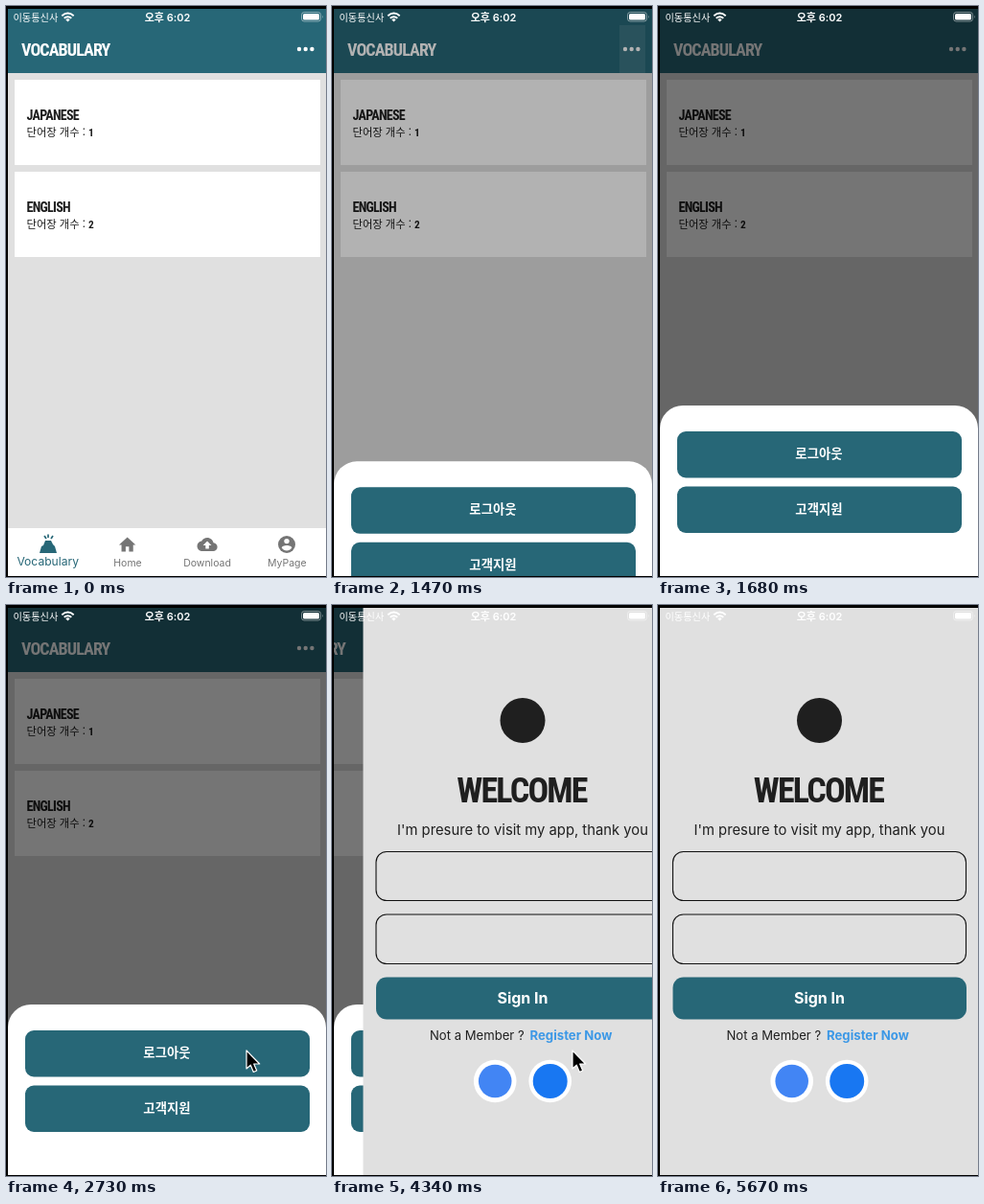
Recreate the animation shown at these times as an HTML page. Size 334 by 596 pixels, loop 6860 ms.

```html
<!DOCTYPE html>
<html lang="ko">
<head>
<meta charset="utf-8">
<title>Vocabulary app</title>
<style>
  html, body { margin: 0; width: 100%; height: 100%; overflow: hidden; background: #000; }
  svg { display: block; width: 334px; height: 596px; }
  text { font-family: Inter, "Noto Sans CJK KR", "Noto Sans CJK", sans-serif; }
  .korean { font-family: "Noto Sans CJK KR", "Noto Sans CJK", sans-serif; }
  .display {
    font-family: "Roboto Condensed", Roboto, sans-serif;
    font-stretch: 75%; font-weight: 800; letter-spacing: -.05em;
  }
  .middle { text-anchor: middle; }
  .nav { font-size: 10.5px; text-anchor: middle; }
  .count { font-size: 11.3px; font-weight: 500; }
  .button { font-size: 13.4px; font-weight: 700; fill: #fff; text-anchor: middle; }
  .teal { fill: #276777; }
</style>
</head>
<body>
<svg viewBox="0 0 334 596">
  <defs>
    <clipPath id="screen"><rect x="2" y="3" width="332" height="592"/></clipPath>
  </defs>
  <g clip-path="url(#screen)">
    <rect width="334" height="596" fill="#e0e0e0"/>

    <g id="home">
      <rect x="2" y="3" width="332" height="67" class="teal"/>
      <text x="16" y="52" class="display" font-size="18" fill="#fff">VOCABULARY</text>
      <rect id="highlight" x="300" y="20" width="27" height="50" fill="#fff"/>
      <g fill="#fff">
        <circle cx="306" cy="45" r="2.2"/><circle cx="312.7" cy="45" r="2.2"/><circle cx="319.4" cy="45" r="2.2"/>
      </g>
      <circle id="touch" cx="311" cy="48" r="2.6" fill="#b5b9ba"/>

      <g fill="#fff">
        <rect x="9" y="77" width="319" height="89"/>
        <rect x="9" y="173" width="319" height="89"/>
      </g>
      <g fill="#1c1c1c">
        <text x="21.5" y="118.500" class="display" font-size="14">JAPANESE</text>
        <text x="21.500" y="136" class="korean count">단어장 개수 : <tspan class="display">1</tspan></text>
        <text x="21.5" y="214.500" class="display" font-size="14">ENGLISH</text>
        <text x="21.500" y="232" class="korean count">단어장 개수 : <tspan class="display">2</tspan></text>
      </g>

      <rect x="2" y="545" width="332" height="50" fill="#fff"/>
      <g class="teal">
        <path d="M35 571L37 564 39 563 41 558H47L49 562 51 564 53 571Z"/>
        <path d="M40 553l2 3M44 551.500v3.500M49 553l-2 3" stroke="#276777" stroke-width="1.7"/>
        <text x="43.700" y="584" class="middle" font-size="12.1">Vocabulary</text>
      </g>
      <g fill="#757575">
        <path transform="translate(116.200 552) scale(.87)" d="M10 20v-6h4v6h5v-8h3L12 3 2 12h3v8z"/>
        <path transform="translate(199.500 551.500) scale(.88)" d="M19.350 10C18.700 6.600 15.600 4 12 4 9.100 4 6.600 5.600 5.350 8 2.300 8.400 0 10.900 0 14c0 3.300 2.700 6 6 6h13c2.800 0 5-2.200 5-5 0-2.600-2-4.800-4.650-5zM14 13v4h-4v-4H7l5-5 5 5z"/>
        <circle cx="293" cy="562" r="9"/>
        <g fill="#fff"><circle cx="293" cy="558.600" r="2.700"/><path d="M287.700 565.600c0-3.600 10.600-3.600 10.600 0-2.400 3.800-8.200 3.800-10.600 0z"/></g>
        <text x="127" y="585" class="nav">Home</text>
        <text x="210" y="585" class="nav">Download</text>
        <text x="293.300" y="585" class="nav">MyPage</text>
      </g>
    </g>

    <rect id="scrim" width="334" height="596"/>

    <g id="sheet">
      <rect x="2" y="417" width="332" height="220" rx="24" fill="#fff"/>
      <rect x="20" y="444" width="297" height="48.500" rx="9" class="teal"/>
      <rect x="20" y="501.500" width="297" height="48.500" rx="9" class="teal"/>
      <text x="168" y="472" class="korean button">로그아웃</text>
      <text x="168" y="529.500" class="korean button">고객지원</text>
    </g>

    <g id="login">
      <rect x="2" y="3" width="332" height="593" fill="#e0e0e0"/>
      <circle cx="168.500" cy="120.500" r="23.500" fill="#1f1f1f"/>
      <g fill="#1f1f1f" class="middle">
        <text x="167.500" y="206" class="display" font-size="36">WELCOME</text>
        <text x="168.500" y="240" font-size="14.800">I'm presure to visit my app, thank you</text>
      </g>
      <g fill="none" stroke="#111" stroke-width="1.100">
        <rect x="15.500" y="257.500" width="306" height="51" rx="11"/>
        <rect x="15.500" y="323" width="306" height="51.500" rx="11"/>
      </g>
      <rect x="15.500" y="388.500" width="306.500" height="44" rx="11" class="teal"/>
      <text x="168.500" y="416" class="middle" font-size="16" font-weight="700" fill="#fff">Sign In</text>
      <text x="71.500" y="454" font-size="13.100" fill="#1f1f1f">Not a Member ?</text>
      <text x="176" y="454" font-size="13.200" font-weight="700" fill="#3c98e6">Register Now</text>
      <g fill="#fff"><circle cx="139.700" cy="497" r="22.300"/><circle cx="197.200" cy="497" r="22.300"/></g>
      <circle cx="139.700" cy="497" r="17.300" fill="#4285f4"/>
      <circle cx="197.200" cy="497" r="18" fill="#1877f2"/>
    </g>

    <g fill="#fff">
      <text x="7.500" y="15.500" class="korean" font-size="10.200">이동통신사</text>
      <g fill="none" stroke="#fff" stroke-width="1.900">
        <path d="M58.300 10.300Q64.500 4.900 70.700 10.300M60.700 12.800Q64.500 9.500 68.300 12.800"/>
      </g>
      <path d="M62.300 14.200Q64.500 12.500 66.700 14.200L64.500 16.500Z"/>
      <text x="168.500" y="15.500" class="middle" font-size="11" font-weight="600">오후 6:02</text>
      <rect x="308.500" y="6.500" width="20" height="9.500" rx="2.800" fill="none" stroke="#fff" stroke-opacity=".45"/>
      <rect x="310" y="8" width="17" height="6.500" rx="1.500"/>
      <path d="M330 9.500q1.500 1.800 0 3.500z" opacity=".5"/>
    </g>

    <path id="cursor" d="M251 465V484L255.300 480.200 258.300 487.500 261.700 486 258.700 479H264.700Z"
          fill="#000" stroke="#fff" stroke-width="1.200" stroke-linejoin="round"/>
  </g>
</svg>
<script>
const LOOP = 6860, STEP = 70;
const SHEET_START = 1400, CURSOR_START = 2730, LOGIN_START = 4270, CURSOR_END = 5670;
const byId = id => document.getElementById(id);
const [home, highlight, touch, scrim, sheet, login, cursor] =
  ["home", "highlight", "touch", "scrim", "sheet", "login", "cursor"].map(byId);

const clamp = v => Math.min(1, Math.max(0, v));
const show = (el, visible) => el.setAttribute("visibility", visible ? "visible" : "hidden");
const move = (el, x, y) => el.setAttribute("transform", `translate(${x} ${y})`);

// Cubic Bézier easing, solved for x by bisection.
function bezier(x1, y1, x2, y2) {
  const at = (a, b, s) => 3 * (1 - s) ** 2 * s * a + 3 * (1 - s) * s * s * b + s ** 3;
  return x => {
    if (x <= 0 || x >= 1) return clamp(x);
    let low = 0, high = 1;
    for (let i = 0; i < 24; i++) {
      const mid = (low + high) / 2;
      if (at(x1, x2, mid) < x) low = mid; else high = mid;
    }
    return at(y1, y2, low);
  };
}
const ease = bezier(.25, .1, .25, 1);
const decelerate = bezier(0, 0, .2, 1);
const slide = bezier(.35, .91, .33, .97);

function draw(time) {
  // The screen refreshes in 70 ms steps while something moves.
  const sheetStep = Math.floor((time - SHEET_START) / STEP);
  const loginStep = Math.floor((time - LOGIN_START) / STEP);

  const opening = sheetStep < 1 ? 0 : clamp((sheetStep * STEP + 11) / 250);
  move(sheet, 0, 179 * (1 - decelerate(opening)));
  show(sheet, opening > 0);
  scrim.setAttribute("opacity", .54 * ease(opening));
  highlight.setAttribute("opacity", sheetStep < 0 ? 0 : .12 * clamp(1 - sheetStep / 4));
  show(touch, sheetStep === 0);

  const entering = loginStep < 0 ? 0 : loginStep > 2 ? 1 : slide((loginStep * STEP + 121) / 400);
  move(login, 332 * (1 - entering), 0);
  show(login, entering > 0);
  move(home, -104 * entering, 0);

  show(cursor, time >= CURSOR_START && time < CURSOR_END);
}

function tick() {
  draw(performance.now() % LOOP);
  requestAnimationFrame(tick);
}
tick();
</script>
</body>
</html>
```
